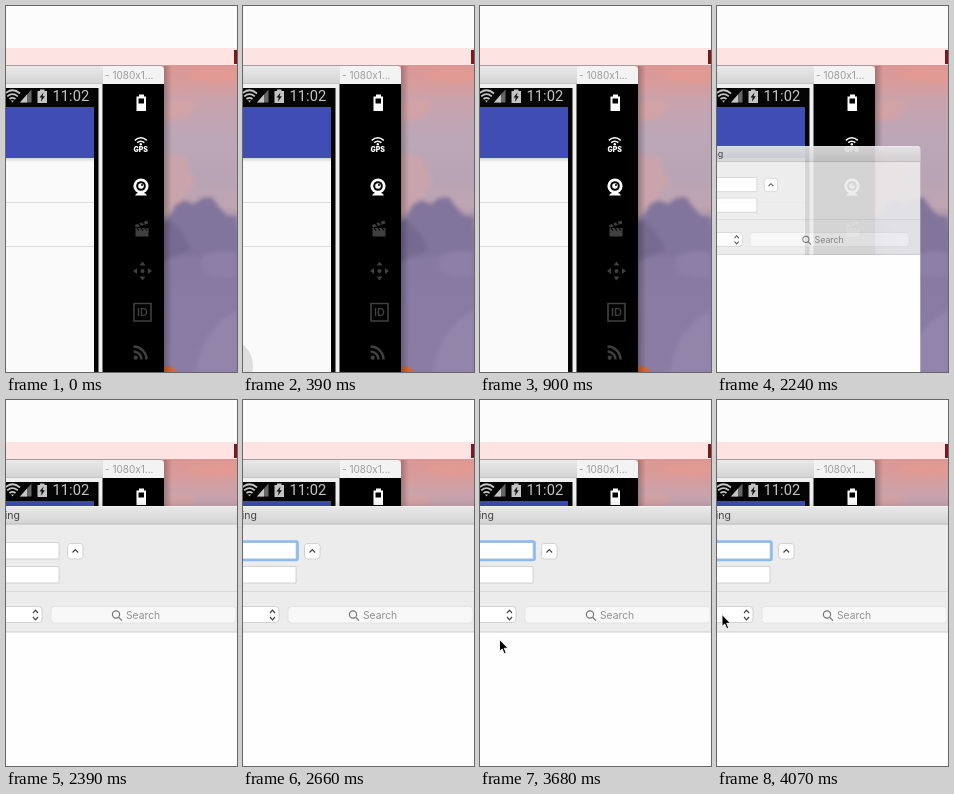
These frames come from a looping animation (231 by 366 pixels, 8000 ms). An HTML page:

```html
<!DOCTYPE html>
<html lang="en">
<head>
<meta charset="utf-8">
<title>Emulator</title>
<style>
html, body { margin: 0; width: 100%; height: 100%; overflow: hidden; background: #fcfcfc; }
svg { display: block; width: 100%; height: 100%; }
text { font-family: Inter, "Open Sans", sans-serif; }
</style>
</head>
<body>
<svg viewBox="0 0 231 366" preserveAspectRatio="xMidYMid meet">
  <defs>
    <linearGradient id="sky" x1="0" y1="0" x2="0" y2="1">
      <stop offset="0" stop-color="#dc9794"/>
      <stop offset=".06" stop-color="#d79c9c"/>
      <stop offset=".12" stop-color="#c8a3ae"/>
      <stop offset=".24" stop-color="#bba7b8"/>
      <stop offset=".36" stop-color="#b8a4b5"/>
      <stop offset=".46" stop-color="#bfa5b2"/>
      <stop offset=".55" stop-color="#8679a0"/>
      <stop offset="1" stop-color="#8b7ca3"/>
    </linearGradient>
    <linearGradient id="bar" x1="0" y1="0" x2="0" y2="1">
      <stop offset="0" stop-color="#e9e9e9"/>
      <stop offset="1" stop-color="#d4d4d4"/>
    </linearGradient>
    <linearGradient id="drop" x1="0" y1="0" x2="0" y2="1">
      <stop offset="0" stop-color="#000" stop-opacity=".16"/>
      <stop offset="1" stop-color="#000" stop-opacity="0"/>
    </linearGradient>
    <linearGradient id="side">
      <stop offset="0" stop-color="#000" stop-opacity=".25"/>
      <stop offset="1" stop-color="#000" stop-opacity="0"/>
    </linearGradient>
    <filter id="soft" x="-30%" y="-30%" width="160%" height="160%"><feGaussianBlur stdDeviation="2"/></filter>
    <filter id="shade" x="-10%" y="-10%" width="120%" height="120%"><feGaussianBlur stdDeviation="7"/></filter>
    <clipPath id="wall"><path d="M155 59h76v307h-76z"/></clipPath>
    <clipPath id="desk"><path d="M0 60h231v306H0z"/></clipPath>
  </defs>

  <rect width="231" height="366" fill="#fcfcfc"/>
  <path d="M0 42h231v17H0z" fill="#fde3e2"/>
  <path d="M228 44h3v14h-3z" fill="#7d171d"/>

  <!-- wallpaper -->
  <g clip-path="url(#wall)">
    <path d="M155 59h76v307h-76z" fill="url(#sky)"/>
    <g filter="url(#soft)">
      <path d="M184 66q24-4 47-2v10q-22 4-47-2z" fill="#e39a92"/>
      <path d="M155 98q20-8 36-2l-12 16-24 4z" fill="#d2a3a6"/>
      <path d="M155 146l24 4 10 26-12 18-22 18z" fill="#c9a4ac"/>
      <path d="M155 220l8-8 6-13 9-5 10 4 8-6 10-1 7 10 8 9 10 1v40h-76z" fill="#82759b"/>
      <path d="M155 216l9-2 12 12 10 18-31 12z" fill="#776b91"/>
      <path d="M196 250q18-8 35-3v24q-20 4-35-6z" fill="#8d7fa6"/>
      <path d="M190 366q6-44 41-62v62z" fill="#9384aa"/>
    </g>
    <path d="M158 366v-5l4-1 5 2 5 4z" fill="#d9652f"/>
    <path d="M158 60h8v306h-8z" fill="url(#side)"/>
  </g>

  <!-- phone window -->
  <path d="M0 60h97v306H0z" fill="#f0f0f0"/>
  <path d="M0 60h97v17H0z" fill="url(#bar)"/>
  <path d="M0 59.500h156" stroke="#a39d9e"/>
  <path d="M0 77.500h97" stroke="#c4c4c4"/>
  <path d="M0 82h92.500v284H0z" fill="#050505"/>
  <path d="M0 101h88v265H0z" fill="#fafafa"/>
  <path d="M0 101h88v51H0z" fill="#3f4db5"/>
  <path d="M0 152h88v4H0z" fill="url(#drop)"/>
  <path d="M0 196.500h88M0 240.500h88" stroke="#dcdcdc"/>
  <circle id="ripple" cx="-17" cy="359.500"/>
  <g fill="#c4c4c4">
    <g fill="none" stroke="#c4c4c4" stroke-width="1.700">
      <path d="M-1 87.500q7.500-6.500 15 0M1.200 90.300q5.300-4.500 10.600 0M3.500 93q3-2.400 6 0"/>
    </g>
    <path d="M5 94.500h3L6.500 96.500z"/>
    <path d="M14 96.500l11.500-13v13z" fill="#666"/>
    <path d="M14 96.500l7-8v8z"/>
    <path d="M31.500 85H34v-1.500h4.500V85H41v12h-9.500z"/>
    <path d="M37.500 86.500l-4 5h2.200l-.8 4.200 4-5.400h-2.300z" fill="#111"/>
    <text x="46.600" y="94.800" font-size="14.700" style="font-family:Roboto,sans-serif">11:02</text>
  </g>

  <!-- tool panel -->
  <path d="M97 60h57q4 0 4 4v14H97z" fill="#f3f3f3"/>
  <path d="M96.500 78H158v288H96.500z" fill="#000"/>
  <text x="99" y="73" font-size="10" fill="#9c9c9c">- 1080x1...</text>
  <g fill="#fff">
    <path d="M130.500 90.500h2.500v-2h5v2h2V105h-9.500z"/>
    <path d="M132.500 92.500h5.500v5h-5.500z" fill="#000"/>
    <path d="M128.800 134.300q6-5 12 0M131.200 136.700q3.600-3 7.200 0" fill="none" stroke="#fff" stroke-width="1.500"/>
    <circle cx="134.800" cy="138.300" r="1.200"/>
    <text x="134.700" y="146" font-size="7" font-weight="900" text-anchor="middle">GPS</text>
    <circle cx="135" cy="180" r="7.600"/>
    <circle cx="135" cy="180" r="4.800" fill="#000"/>
    <circle cx="135" cy="180" r="2.800"/>
    <circle cx="136" cy="179" r="1" fill="#000"/>
    <path d="M129 189.500q1-2.500 3-2.500h6q2 0 3 2.500z"/>
  </g>
  <g fill="#404040">
    <path d="M129.500 222h13v8.500h-13zM129 219l12.500-4.500.8 3-12.500 4z"/>
    <path d="M132 217l2.500 3M136 215.500l2.500 3M131 222l2 2.500M135 222l2 2.500M139 222l2 2.500" stroke="#000" stroke-width="1.200"/>
    <path d="M136.500 255.500l3 4h-6zM136.500 274.500l3-4h-6zM127 265l4-3v6zM146 265l-4-3v6z"/>
    <circle cx="136.500" cy="265" r="2"/>
    <g fill="none" stroke="#404040">
      <path d="M128 297.500h17v17.500h-17z" stroke-width="1.600"/>
      <path d="M127.500 340.500a13 13 0 0 1 13 13M127.500 345.500a8 8 0 0 1 8 8" stroke-width="2.500"/>
    </g>
    <text x="136.500" y="310.300" font-size="11" font-weight="600" text-anchor="middle">ID</text>
    <circle cx="129.700" cy="351.700" r="2.100"/>
  </g>

  <!-- dialog -->
  <g clip-path="url(#desk)">
    <g id="dialog">
      <rect x="-60" y="110" width="303" height="350" filter="url(#shade)" id="shadow"/>
      <path d="M-60 232h303v228H-60z" fill="#fefefe"/>
      <g id="head">
        <path d="M-60 106h299q4 0 4 4v122H-60z" fill="#ececec"/>
        <path d="M-60 106h299q4 0 4 4v14H-60z" fill="url(#bar)"/>
        <path d="M-60 106.500h301" stroke="#f4f4f4"/>
        <path d="M-60 124h303" stroke="#bababa"/>
        <path d="M-60 191.500h303" stroke="#d9d9d9"/>
        <path d="M-60 232h303" stroke="#cdcdcd"/>
        <text x="14" y="119" font-size="10.500" text-anchor="end" fill="#444">ing</text>
        <g fill="#fff" stroke="#cacaca" stroke-width=".8">
          <path d="M-40 142.500h93v16.500h-93zM-40 166.500h93v16.500h-93z"/>
          <rect x="61.500" y="143.500" width="15.500" height="15.500" rx="3"/>
          <rect x="-50" y="206.500" width="86" height="16" rx="3.500"/>
          <rect x="45" y="206.500" width="185" height="16.500" rx="3.500" fill="#f8f8f8" stroke="#e0e0e0"/>
        </g>
        <g fill="none" stroke="#444" stroke-width="1.200">
          <path d="M66.500 152.500l2.800-2.800 2.800 2.800M27 213l2.500-2.800 2.500 2.800M27 217l2.500 2.800 2.500-2.800"/>
          <path d="M112.800 217.500l3.200 3.200" stroke="#777"/>
          <circle cx="110" cy="214.500" r="3.600" stroke="#777"/>
        </g>
        <text x="120" y="218.700" font-size="10.300" fill="#929292">Search</text>
      </g>
    </g>
  </g>
  <rect id="ring" fill="none" stroke="#8dbaf0" rx="1.500"/>
  <path id="cursor" d="M0 0v12l2.700-2.500 2 4.700 2-.9-2-4.500h3.800z" fill="#000" stroke="#fff" stroke-width=".9"/>
</svg>
<script>
const LOOP = 8000;
const $ = id => document.getElementById(id);
const set = (id, attrs) => {
  for (const k in attrs) $(id).setAttribute(k, attrs[k]);
};
const show = (id, on) => set(id, { visibility: on ? 'visible' : 'hidden' });

// Each track is a list of [start, ...values]; values hold until the next start.
const tracks = {
  ripple: [[390, 27, '#dedede'], [520, 37.5, '#d2d2d2'], [660, 47.7, '#cbcbcb'], [780, 54.5, '#e6e6e6'], [900, 0, 'none']],
  dialog: [[2240, .86, -5.7, 48.9, .9], [2390, 1, 0, 0, 1]],
  ring: [[2540, 1, .5], [2660, 0, 1]],
  cursor: [[3250, 20.5, 256.5], [3370, 20.5, 246], [3680, 19.5, 239.5], [3830, 15, 231], [3950, 9, 220], [4070, 5, 214.5]]
};
const at = (name, t) => tracks[name].filter(k => k[0] <= t).pop();

function draw(t) {
  const ripple = at('ripple', t), dialog = at('dialog', t);
  const ring = at('ring', t), cursor = at('cursor', t);
  show('ripple', ripple);
  show('dialog', dialog);
  show('ring', ring);
  show('cursor', cursor);
  if (ripple) set('ripple', { r: ripple[1], fill: ripple[2] });
  if (dialog) {
    const [, s, x, y, alpha] = dialog;
    set('dialog', { transform: `matrix(${s} 0 0 ${s} ${x} ${y})` });
    set('head', { opacity: alpha });
    // The backing shadow stays clear of the translucent header while zooming.
    set('shadow', { opacity: alpha < 1 ? 0 : .3 });
  }
  if (ring) {
    const [, grow, alpha] = ring;
    set('ring', {
      x: -40, y: 141.5 - grow, width: 94.5 + grow, height: 18.5 + 2 * grow,
      'stroke-width': 2.6, opacity: alpha
    });
  }
  if (cursor) set('cursor', { transform: `translate(${cursor[1]} ${cursor[2]})` });
}

const start = performance.now();
function tick() {
  draw((performance.now() - start) % LOOP);
  requestAnimationFrame(tick);
}
tick();
</script>
</body>
</html>
```
